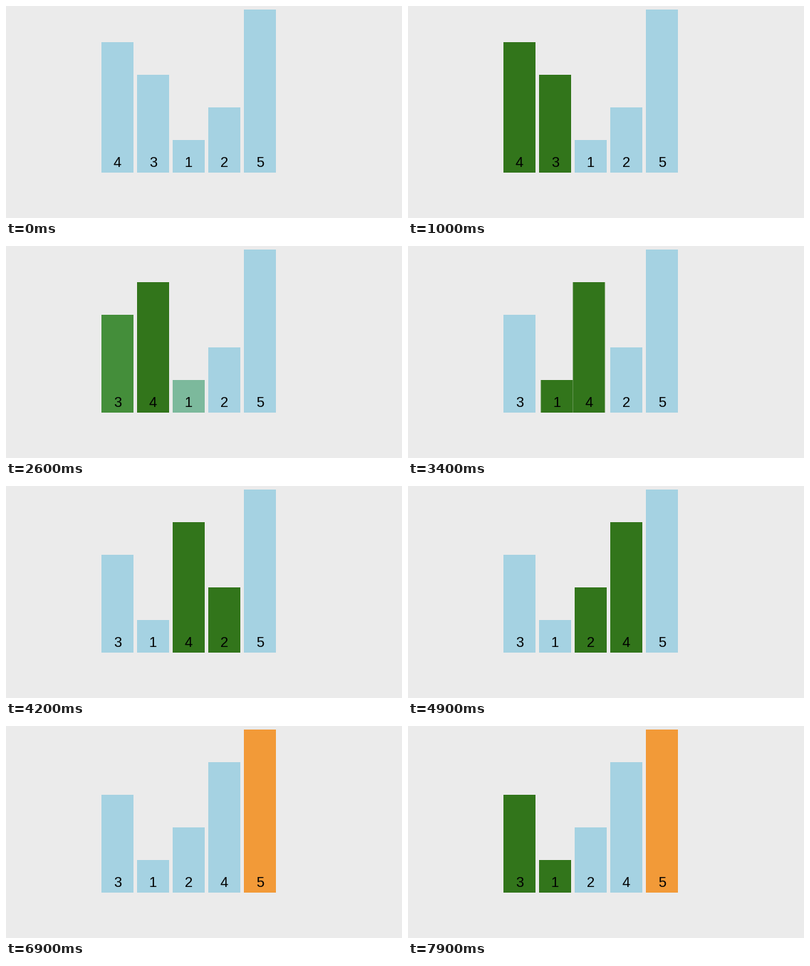
A matplotlib script that plays this animation: 556 by 299 pixels, repeating every 8000 ms.

```python
import numpy as np
import matplotlib.pyplot as plt
from matplotlib.animation import FuncAnimation
from matplotlib.patches import Rectangle

WIDTH, HEIGHT, DPI = 556, 299, 64
FRAMES, INTERVAL = 80, 100

BACKGROUND = "#ebebeb"
BLUE = np.array([165, 210, 226]) / 255
GREEN = np.array([50, 117, 27]) / 255
ORANGE = np.array([242, 154, 56]) / 255

LEFT, PITCH, BAR_WIDTH = 134, 50, 45
FLOOR, UNIT, BASELINE = 235, 46, 227

# Bubble sort steps fall on a steady beat; each one is a short transition.
FIRST_BEAT, BEAT, DURATION = 370, 709.5, 250
START = [4, 3, 1, 2, 5]
PAINTS = [
    (0, {4: GREEN, 3: GREEN}),
    (3, {3: BLUE, 1: GREEN}),
    (5, {1: BLUE, 2: GREEN}),
    (7, {2: BLUE, 5: GREEN}),
    (8, {4: BLUE, 5: ORANGE}),
    (10, {3: GREEN, 1: GREEN}),
]
SWAPS = [(2, 4, 3), (4, 4, 1), (6, 4, 2)]


def progress(beat, time):
    """Cubic in-out progress of the transition on the given beat."""
    t = (time - FIRST_BEAT - beat * BEAT) / DURATION
    t = min(max(t, 0), 1)
    return 4 * t**3 if t < 0.5 else 1 - 4 * (1 - t) ** 3


def blend(start, end, p):
    """Mix colours; red and blue rise late when leaving green."""
    if end is GREEN:
        start, end, p = end, start, 1 - p
    return start + (end - start) * p ** np.array([1.4, 1, 1.4])


def color_at(value, time):
    current = BLUE
    for beat, paint in PAINTS:
        if value not in paint:
            continue
        p = progress(beat, time)
        if p < 1:
            return blend(current, paint[value], p) if p > 0 else current
        current = paint[value]
    return current


def slots_at(time):
    slots = {value: float(i) for i, value in enumerate(START)}
    for beat, big, small in SWAPS:
        p = progress(beat, time)
        slots[big] += p
        slots[small] -= p
    return slots


fig = plt.figure(figsize=(WIDTH / DPI, HEIGHT / DPI), dpi=DPI, facecolor=BACKGROUND)
ax = fig.add_axes([0, 0, 1, 1])
ax.set_xlim(0, WIDTH)
ax.set_ylim(HEIGHT, 0)
ax.axis("off")

bars, labels = {}, {}
for value in START:
    height = UNIT * value
    bars[value] = ax.add_patch(
        Rectangle((0, FLOOR - height), BAR_WIDTH, height, linewidth=0, snap=False)
    )
    labels[value] = ax.text(
        0, BASELINE, str(value), family="Liberation Sans", fontsize=20 * 72 / DPI,
        color="black", ha="center", va="baseline",
    )


def draw(frame):
    time = frame * INTERVAL
    for value, slot in slots_at(time).items():
        x = LEFT + PITCH * slot
        bars[value].set_x(x)
        bars[value].set_facecolor(color_at(value, time))
        labels[value].set_x(x + BAR_WIDTH / 2)
    return [*bars.values(), *labels.values()]


animation = FuncAnimation(
    fig, draw, frames=FRAMES, interval=INTERVAL, repeat=True, repeat_delay=0
)
plt.show()
```
